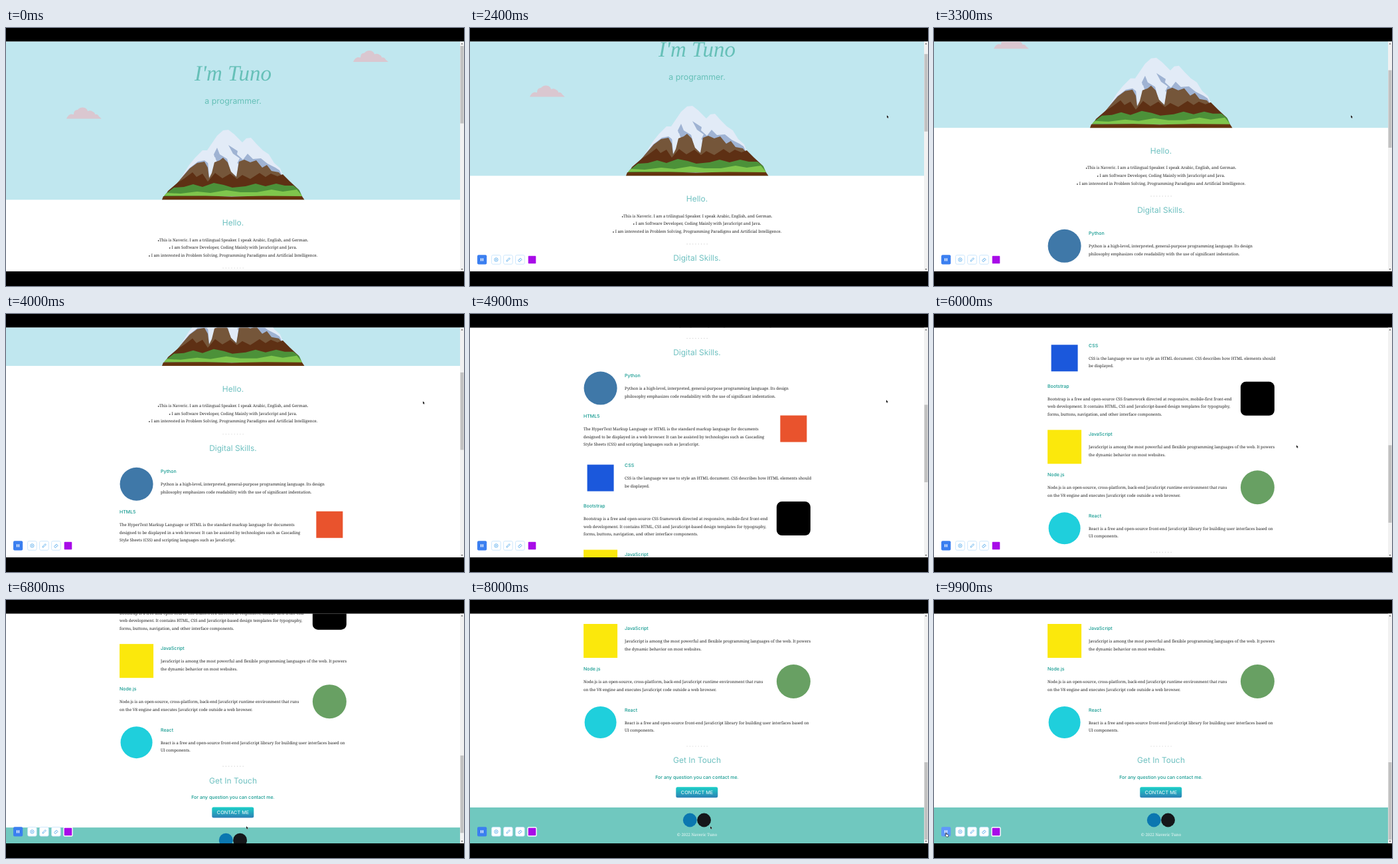
An HTML page for the animation above (10000 ms loop, 690 by 388 pixels).

```html
<!DOCTYPE html>
<html lang="en">
<head>
<meta charset="utf-8">
<title>Portfolio scroll</title>
<style>
  html, body { margin: 0; height: 100%; overflow: hidden; background: #000; }
  svg { display: block; width: 100vw; height: 100vh; }
  text { white-space: pre; text-rendering: geometricPrecision; }
  .body { font: 6.04px "Noto Serif", serif; fill: #222; }
  .sub { font: 500 7px Inter, sans-serif; fill: #11998f; }
  .head { font: 12px Inter, sans-serif; fill: #6fc1c1; }
  .title { font: italic 33px "Liberation Serif", serif; fill: #66c0b8; }
  .tag { font: 12.4px Inter, sans-serif; fill: #66c0b8; }
  .button { font: 7.3px Inter, sans-serif; fill: #fff; }
  .foot { font: 6px "Noto Serif", serif; fill: #f4fbfa; }
  .mid { text-anchor: middle; }
</style>
</head>
<body>
<svg viewBox="0 0 690 388">
  <defs>
    <linearGradient id="shine" x2="0" y2="1">
      <stop stop-color="#1cd0c8"/><stop offset="1" stop-color="#2d80b4"/>
    </linearGradient>
    <clipPath id="view"><path d="M0 20.5H690V366H0z"/></clipPath>
    <path id="cloud" fill="#dac7d0" d="M0 17.5Q3 11 7 10.5L11 11Q11 4 17 4Q20 0 25 .5Q31 1 32 6Q37 4 40 7Q43 8 43 11Q47 10 49 14L53 17.5z"/>
  </defs>
  <rect width="690" height="388"/>
  <g clip-path="url(#view)">
    <rect width="690" height="388" fill="#fff"/>
    <g id="page"></g>
    <rect x="684" y="20" width="6" height="346" fill="#f1f1f1"/>
    <path fill="#555" d="M685.6 24.5L687 22.6L688.4 24.5zM685.6 362L687 363.9L688.4 362z"/>
    <rect id="thumb" x="684.5" y="27" width="5" height="116.5" fill="#c1c1c1"/>
  </g>
  <g id="tools">
    <rect id="pause" x="11" y="341.2" width="14.2" height="14.2" rx="2"/>
    <path d="M16.6 346.2v4.4M19.4 346.2v4.4" stroke="#fff" stroke-width="1.4"/>
    <g fill="#fff" stroke="#bfe0fb" stroke-width=".8">
      <rect x="32.6" y="341.6" width="13.6" height="13.6" rx="2"/>
      <rect x="50.6" y="341.6" width="13.6" height="13.6" rx="2"/>
      <rect x="68.6" y="341.6" width="13.6" height="13.6" rx="2"/>
    </g>
    <g fill="none" stroke="#62b0ec" stroke-width=".9">
      <circle cx="39.4" cy="348.4" r="2.7"/><circle cx="39.4" cy="348.4" r=".8"/>
      <path d="M55 351l.6-1.9 3.5-3.5 1.3 1.3-3.5 3.5z"/>
      <path d="M72.6 349.4l3.4-3.4 2.2 2.2-3.2 3.2h-1.2zM74.4 347.6l2.2 2.2"/>
    </g>
    <rect x="87" y="342" width="13" height="13" rx="1.5" fill="#a80be8" stroke="#fff" stroke-width="1.4"/>
  </g>
  <path id="arrow" d="M0 0V4.4L1 3.5L1.7 5L2.4 4.7L1.8 3.3H3.1z" stroke="#fff" stroke-width=".25"/>
  <path id="hand" d="M.4 0Q1 -.4 1.2 .3V2.2L3.9 2.8Q4.6 3 4.4 4L3.9 6.2H1.2L-.9 3.7Q-.6 3 .2 3.6z" fill="#fff" stroke="#000" stroke-width=".6"/>
</svg>
<script>
const $ = id => document.getElementById(id);
const CENTRE = 342, LINE = 11.55, NOTCH = 36.05, MAX_SCROLL = 643, LOOP = 10000;

const text = (cls, x, y, s) => `<text class="${cls}" x="${x}" y="${y}">${s}</text>`;
const mid = (cls, y, s) => text(cls + ' mid', CENTRE, y, s);
const poly = (fill, points) => `<polygon fill="${fill}" points="${points}"/>`;
const rect = (fill, x, y, w, h, r = 0) =>
  `<rect fill="${fill}" x="${x}" y="${y}" width="${w}" height="${h}" rx="${r}"/>`;
const circle = (fill, x, y, r) => `<circle fill="${fill}" cx="${x}" cy="${y}" r="${r}"/>`;
const paragraph = (x, y, lines) =>
  lines.map((s, i) => text('body', x, y + i * LINE, s)).join('');
const divider = y =>
  `<path d="M326.5 ${y}H359" stroke="#d4d4d4" stroke-width="1.2" stroke-dasharray="1.2 3.1"/>`;
const bullet = '<tspan font-size="4">●</tspan>';

const mountain = [
  ['#e2ebf7', '262,228 276,206 285,195 296,184 303,184 318,162 327,154 335,153 344,160 356,172 362,166 369,165 377,174 387,184 396,190 404,203 413,211 419,226'],
  ['#9fb3d3', '262,228 276,211 289,201 299,199 308,206 312,222 316,200 313,190 318,180 322,190 332,196 340,202 348,204 352,196 342,189 335,176 349,185 348,190 357,198 364,189 372,197 384,196 394,204 406,210 412,214 419,228'],
  ['#e2ebf7', '304,199 315,194 318,203 309,226 306,224'],
  ['#e2ebf7', '332,192 341,200 350,204 348,224 338,216'],
  ['#75563a', '258,233 270,219 277,211 288,203 299,201 304,210 306,226 310,218 314,202 322,199 327,195 334,202 339,216 347,224 351,201 359,198 368,202 377,199 386,210 393,206 400,215 411,217 424,232'],
  ['#5e3014', '244,245 258,233 269,226 281,217 287,224 296,219 304,231 315,218 326,226 338,219 348,227 356,221 368,227 382,218 391,224 399,219 409,223 417,220 428,231 441,243 445,252 240,252'],
  ['#4c9139', '241,249 253,240 268,239 282,235 296,239 313,233 328,236 341,240 361,238 376,234 391,238 407,234 420,237 433,237 442,244 446,253 238,253'],
  ['#7fc64c', '238,252 243,248 263,249 288,246 308,248 332,244 353,247 378,247 400,243 417,246 438,243 445,251 446,254'],
  ['#65340f', '237,253 300,252.5 340,253.5 390,252.5 446,253 449.5,258.3 235,258.3']
];

// name, heading centre, picture on the right, picture, lines
const box = (c, size, r) => (x, y) => rect(c, x - size / 2, y - size / 2, size, size, r);
const disc = (c, r) => (x, y) => circle(c, x, y, r);
const skills = [
  ['Python', 417, 0, disc('#3f78a8', 25), [
    'Python is a high-level, interpreted, general-purpose programming language. Its design',
    'philosophy emphasizes code readability with the use of significant indentation.']],
  ['HTML5', 478, 1, box('#e9532d', 40), [
    'The HyperText Markup Language or HTML is the standard markup language for documents',
    'designed to be displayed in a web browser. It can be assisted by technologies such as Cascading',
    'Style Sheets (CSS) and scripting languages such as JavaScript.']],
  ['CSS', 552, 0, box('#1b58dc', 40), [
    'CSS is the language we use to style an HTML document. CSS describes how HTML elements should',
    'be displayed.']],
  ['Bootstrap', 613, 1, box('#000', 51, 8), [
    'Bootstrap is a free and open-source CSS framework directed at responsive, mobile-first front-end',
    'web development. It contains HTML, CSS and JavaScript-based design templates for typography,',
    'forms, buttons, navigation, and other interface components.']],
  ['JavaScript', 685.5, 0, box('#fbe80c', 51), [
    'JavaScript is among the most powerful and flexible programming languages of the web. It powers',
    'the dynamic behavior on most websites.']],
  ['Node.js', 746.5, 1, disc('#68a063', 25.5), [
    'Node.js is an open-source, cross-platform, back-end JavaScript runtime environment that runs',
    'on the V8 engine and executes JavaScript code outside a web browser.']],
  ['React', 808, 0, disc('#1fcfdc', 24), [
    'React is a free and open-source front-end JavaScript library for building user interfaces based on',
    'UI components.']]
];

const skill = ([name, y, right, picture, lines]) => {
  const x = right ? 171 : 233;
  return picture(right ? 487.4 : 196.6, y + 19) +
    text('sub', x, y + 2.5, name) + paragraph(x, y + 21.6, lines);
};

$('page').innerHTML =
  rect('#c0e7ef', 0, 0, 690, 258.3) +
  '<use href="#cloud" x="523" y="33.5"/><use href="#cloud" id="drift"/>' +
  mountain.map(m => poly(...m)).join('') +
  mid('title', 79, 'I\'m Tuno') +
  mid('tag', 114, 'a programmer.') +
  mid('head', 297.4, 'Hello.') +
  [bullet + 'This is Naveric. I am a trilingual Speaker. I speak Arabic, English, and German.',
   bullet + ' I am Software Developer, Coding Mainly with JavaScript and Java.',
   bullet + ' I am interested in Problem Solving, Programming Paradigms and Artificial Intelligence.'
  ].map((s, i) => mid('body', 320.6 + i * LINE, s)).join('') +
  divider(361) +
  mid('head', 386.4, 'Digital Skills.') +
  skills.map(skill).join('') +
  divider(863) +
  mid('head', 888.4, 'Get In Touch') +
  mid('sub', 912, 'For any question you can contact me.') +
  rect('url(#shine)', 310.3, 924.3, 63, 16, 2.5) +
  mid('button', 935.1, 'CONTACT ME') +
  rect('#70c8bf', 0, 955, 690, 60) +
  circle('#0b77b0', 331.3, 974, 10.4) + circle('#15171a', 352.6, 974, 10.4) +
  mid('foot', 997.7, '© 2022 Naveric Tuno');

const clamp = v => Math.min(1, Math.max(0, v));
const smooth = v => v * v * (3 - 2 * v);

// start times of the wheel notches
const notches = [2050, 2600, 3050, 3450, 3800, 4120, 4350, 4550, 4700,
  4950, 5100, 5300, 5600, 5800, 6050, 6300, 6550, 7450];
const scrollAt = t => Math.min(MAX_SCROLL, NOTCH * notches.reduce(
  (sum, start) => sum + 1 - (1 - clamp((t - start) / 180)) ** 2, 0));

// time, x, y
const track = [[100, 18, 349], [1100, 628, 131], [4600, 628, 131], [4900, 627, 129],
  [5400, 625, 135.5], [5600, 625, 135.5], [6700, 362, 340], [8600, 362, 340], [9600, 17.5, 350]];
function pointerAt(t) {
  const i = track.findIndex(k => k[0] > t);
  if (i < 0) return track[track.length - 1].slice(1);
  const b = track[i], a = track[i - 1] || b;
  const p = smooth(clamp((t - a[0]) / (b[0] - a[0] || 1)));
  return [a[1] + (b[1] - a[1]) * p, a[2] + (b[2] - a[2]) * p];
}

function draw(now) {
  const t = Math.floor(now % LOOP / 100) * 100;
  const scroll = scrollAt(t), settle = clamp((t - 100) / 1000), hover = t >= 9600;
  $('page').setAttribute('transform', `translate(0 ${-scroll})`);
  $('thumb').setAttribute('y', 27 + 217 * scroll / MAX_SCROLL);
  $('drift').setAttribute('transform', `translate(${91 - settle} ${119 + 3 * settle})`);
  $('tools').setAttribute('opacity', clamp((t - 100) / 300));
  $('pause').setAttribute('fill', hover ? '#5f97fa' : '#3b7ff0');
  const place = `translate(${pointerAt(t)})`;
  for (const [id, shown] of [['arrow', t >= 200 && !hover], ['hand', hover]]) {
    $(id).setAttribute('transform', place);
    $(id).setAttribute('visibility', shown ? 'visible' : 'hidden');
  }
}

let start;
function tick(now) {
  start ??= now;
  draw(now - start);
  requestAnimationFrame(tick);
}
draw(0);
requestAnimationFrame(tick);
</script>
</body>
</html>
```
